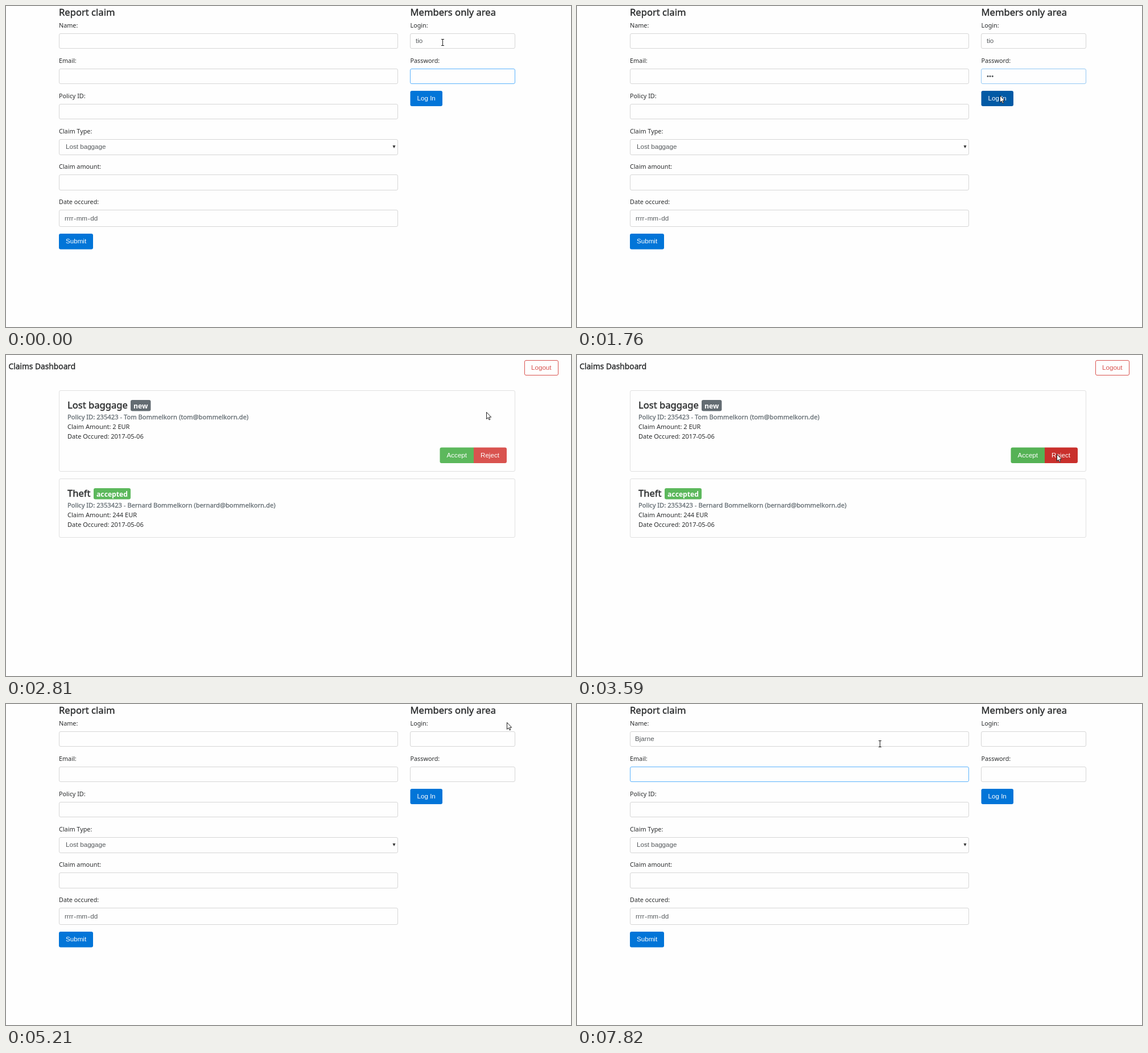
Write an HTML page with a canvas that moves like this. It is 993 px wide and 564 px high and loops after 8 s.

```html
<!DOCTYPE html>
<html lang="en">
<head>
<meta charset="utf-8">
<title>Claims</title>
<style>
  html, body { margin: 0; width: 100%; height: 100%; overflow: hidden; background: #fefefe; }
  canvas { display: block; }
</style>
</head>
<body>
<canvas id="stage" width="993" height="564"></canvas>
<script>
const ctx = document.getElementById('stage').getContext('2d');
const LOOP = 8000;
const SANS = '"Noto Sans", "Open Sans", sans-serif';
const ARIAL = '"Liberation Sans", Arial, sans-serif';
const C = {
  bg: '#fefefe', ink: '#292b2c', muted: '#636c72', field: '#55595c', line: '#d6d6d6',
  card: '#e0e0e0', focus: '#5cb3fd', fading: '#93c8f4', blue: '#0275d8', blueHover: '#025aa5',
  green: '#5cb85c', greenHover: '#449d44', red: '#d9534f', redHover: '#c9302c'
};

// Each track is [start time, value...]; a value holds until the next start.
const pointer = [
  [0, 767, 64, 'beam'],
  [1230, 765, 139], [1370, 757, 144], [1520, 750, 150], [1640, 743, 157],
  [2300, 750, 154], [2420, 775, 140], [2540, 812, 118], [2670, 837, 102],
  [2810, 844, 100], [2940, 843, 135], [3090, 833, 160], [3210, 811, 175],
  [3350, 823, 176], [3470, 836, 175], [3590, 843, 174],
  [4270, 897, 70], [4400, 937, 22], [4540, 942, 19], [4670, 945, 17],
  [5210, 880, 32], [5340, 730, 60, 'beam'], [5460, 590, 72, 'beam'], [5580, 532, 70, 'beam']
];
const secretLength = [[0, 0], [120, 1], [270, 2], [850, 3]];
const nameLength = [[0, 0], [6280, 1], [6550, 3], [6690, 4], [6820, 5], [7110, 6]];
const logInFill = [[0, C.blue], [1520, '#0268bf'], [1640, C.blueHover], [5090, C.blue]];
const acceptFill = [[0, C.green], [3350, C.greenHover], [3470, '#4ca64c'], [3590, '#55b255']];
const rejectFill = [[0, C.red], [3470, '#d1423e'], [3590, C.redHover]];
const logoutFill = [[0, null], [4540, '#e5908d'], [4670, C.red]];
const secretLine = [[0, C.focus], [1760, C.fading], [1910, C.line]];
const nameLine = [[0, C.line], [5870, C.focus], [7270, C.fading], [7420, C.line]];
const emailLine = [[0, C.line], [7270, C.fading], [7420, C.focus]];

const entry = (track, t) => track.filter(e => e[0] <= t).pop();
const at = (track, t) => entry(track, t)[1];
const within = (t, a, b) => t >= a && t < b;

function text(str, x, y, font, color, weight = 0) {
  ctx.font = font;
  ctx.fillStyle = color;
  ctx.fillText(str, x, y);
  if (weight) {
    ctx.strokeStyle = color;
    ctx.lineWidth = weight;
    ctx.strokeText(str, x, y);
  }
}

const heading = (str, x, y, size = 16.6) => text(str, x, y, `${size}px ${SANS}`, C.ink, 0.4);
const label = (str, x, y, size = 10.8) => text(str, x, y, `${size}px ${SANS}`, C.ink);
const control = (str, x, y, color = C.field) => text(str, x, y, `11.63px ${ARIAL}`, color);

function fillBox(x, y, w, h, color, radius = 3) {
  ctx.beginPath();
  ctx.roundRect(x, y, w, h, radius);
  ctx.fillStyle = color;
  ctx.fill();
}

function frameBox(x, y, w, h, color) {
  ctx.beginPath();
  ctx.roundRect(x + 0.5, y + 0.5, w - 1, h - 1, 2.5);
  ctx.strokeStyle = color;
  ctx.lineWidth = 1;
  ctx.stroke();
}

function button(str, x, y, w, h, color, radius) {
  fillBox(x, y, w, h, color, radius);
  control(str, x + 12, y + 17, '#fff');
}

function caret(x, y) {
  ctx.fillStyle = '#444';
  ctx.fillRect(x, y, 1, 13);
}

function drawForm(t) {
  const first = t < 1910;
  heading('Report claim', 93, 17);
  const labels = ['Name:', 'Email:', 'Policy ID:', 'Claim Type:', 'Claim amount:', 'Date occured:'];
  const lines = [at(nameLine, t), at(emailLine, t)];
  labels.forEach((str, i) => {
    const y = 38 + i * 62;
    label(str, 93, y);
    frameBox(93, y + 10, 596, [27, 27, 27, 28, 28, 30][i], lines[i] || C.line);
  });

  control('Lost baggage', 105, 251);
  ctx.beginPath();
  ctx.moveTo(679.5, 245);
  ctx.lineTo(684.5, 245);
  ctx.lineTo(682, 250);
  ctx.fillStyle = '#333';
  ctx.fill();

  let x = 103;
  for (const part of ['rrrr', '-', 'mm', '-', 'dd']) {
    control(part, x, 377);
    x += ctx.measureText(part).width + 0.65;
  }
  button('Submit', 93, 400, 60, 27.5, C.blue);

  heading('Members only area', 710.5, 17);
  label('Login:', 710.5, 38);
  frameBox(710, 48, 185, 27, C.line);
  label('Password:', 710.5, 100);
  frameBox(710, 110, 185, 27, at(secretLine, t));
  button('Log In', 710.5, 149, 56.5, 27, at(logInFill, t));

  if (first) {
    control('tio', 720, 65);
    const dots = '•'.repeat(at(secretLength, t));
    control(dots, 720, 127);
    if (within(t, 120, 1370)) caret(Math.round(720 + ctx.measureText(dots).width), 117);
    return;
  }

  const name = 'Bjarne'.slice(0, at(nameLength, t));
  control(name, 102, 65);
  if (within(t, 5720, 7270)) {
    caret(Math.round(102 + ctx.measureText(name).width), 55);
    ctx.beginPath();
    ctx.arc(682, 54.5, 4, 0, Math.PI * 2);
    ctx.fillStyle = '#efe6c6';
    ctx.fill();
  }
  if (within(t, 7270, 7820)) caret(102, 118);
}

function drawCard(y, h, claim) {
  frameBox(93, y, 802, h, C.card);
  heading(claim.title, 108, y + 32);
  const font = `bold 12.2px ${SANS}`;
  ctx.font = font;
  fillBox(claim.badgeX, y + 17, ctx.measureText(claim.status).width + 10, 19.5, claim.color);
  text(claim.status, claim.badgeX + 5, y + 32, font, '#fff');
  text(claim.holder, 108, y + 51, `11.2px ${SANS}`, C.muted, 0.3);
  label('Claim Amount: ' + claim.amount, 108, y + 67.5, 11);
  label('Date Occured: 2017-05-06', 108, y + 84.5, 11);
}

function drawDashboard(t) {
  const rejected = t >= 4150;
  heading('Claims Dashboard', 4.5, 25, 13.76);
  if (t >= 4400) {
    ctx.fillStyle = '#f5f5f5';
    ctx.fillRect(884, 22, 71, 23);
  }

  const fill = at(logoutFill, t);
  fillBox(911, 9, 60, 27, fill || C.bg);
  frameBox(911, 9, 60, 27, C.red);
  control('Logout', 923, 26, fill ? '#fff' : C.red);

  drawCard(62, rejected ? 104 : 143, {
    title: 'Lost baggage', badgeX: 219,
    status: rejected ? 'rejected' : 'new',
    color: rejected ? C.red : C.muted,
    holder: 'Policy ID: 235423 - Tom Bommelkorn (tom@bommelkorn.de)',
    amount: '2 EUR'
  });
  drawCard(rejected ? 178 : 217, 104, {
    title: 'Theft', badgeX: 154, status: 'accepted', color: C.green,
    holder: 'Policy ID: 2353423 - Bernard Bommelkorn (bernard@bommelkorn.de)',
    amount: '244 EUR'
  });
  if (!rejected) {
    button('Accept', 762.5, 162.5, 59.5, 27.5, at(acceptFill, t), [3, 0, 0, 3]);
    button('Reject', 822, 162.5, 58, 27.5, at(rejectFill, t), [0, 3, 3, 0]);
  }
}

function drawPointer(t) {
  const [, x, y, kind] = entry(pointer, t);
  ctx.lineWidth = 1;
  ctx.strokeStyle = '#222';
  ctx.beginPath();
  if (kind === 'beam') {
    ctx.moveTo(x + 0.5, y - 5);
    ctx.lineTo(x + 0.5, y + 5);
    for (const end of [-5.5, 5.5]) {
      ctx.moveTo(x - 2, y + end);
      ctx.lineTo(x + 3, y + end);
    }
  } else {
    const arrow = [[0, 0], [0, 12], [2.7, 9.4], [4.6, 13.5], [6.4, 12.7], [4.6, 8.7], [8.2, 8.7]];
    arrow.forEach(([dx, dy]) => ctx.lineTo(x + 0.5 + dx, y + 0.5 + dy));
    ctx.closePath();
    ctx.fillStyle = '#fff';
    ctx.fill();
  }
  ctx.stroke();
}

const start = performance.now();

function draw() {
  const t = (performance.now() - start) % LOOP;
  ctx.fillStyle = C.bg;
  ctx.fillRect(0, 0, 993, 564);
  if (within(t, 1910, 5090)) drawDashboard(t);
  else drawForm(t);
  drawPointer(t);
  requestAnimationFrame(draw);
}
draw();
</script>
</body>
</html>
```
